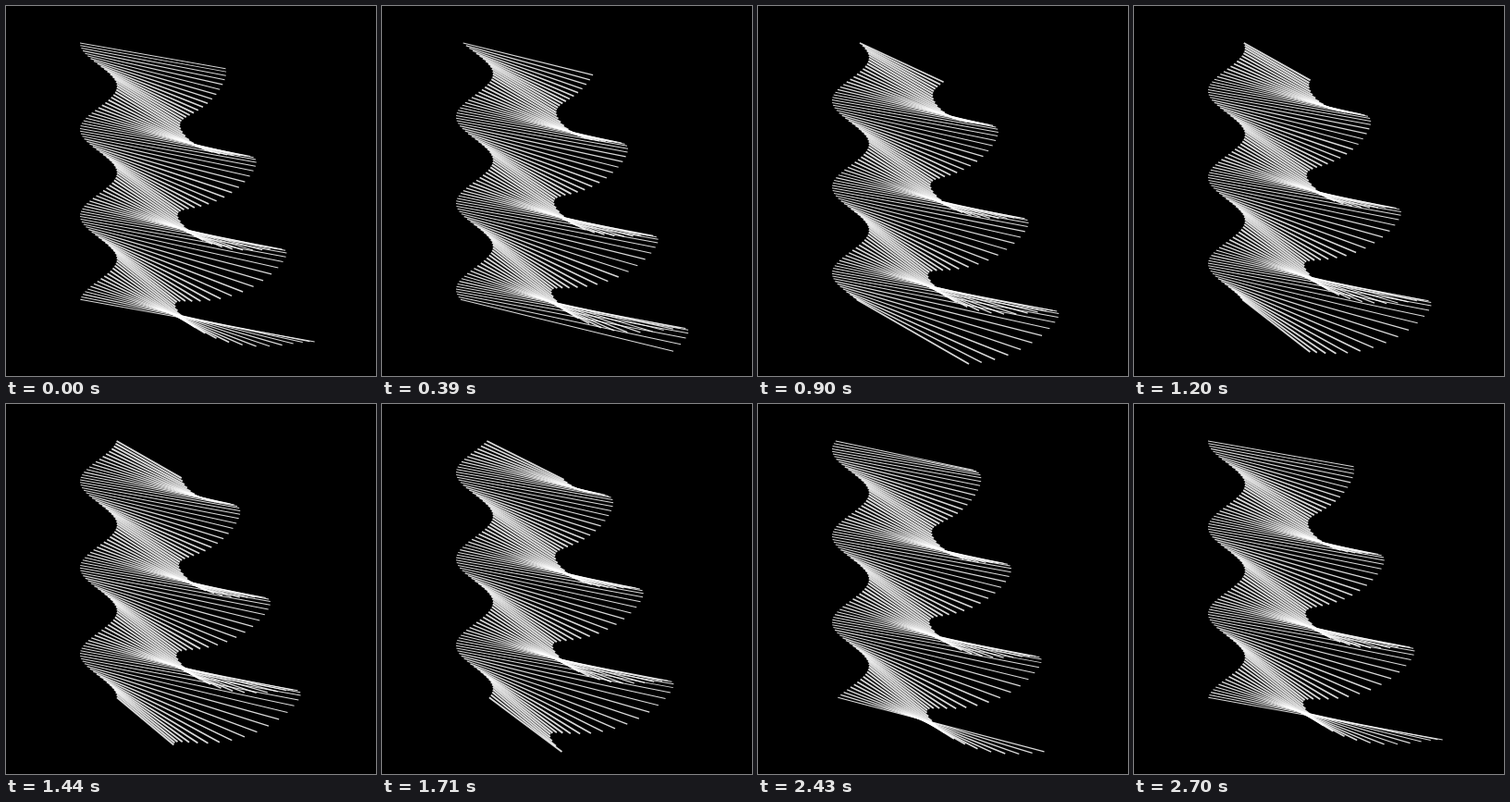
Animation, 400 px wide and 400 px high, one loop 2.73 s. Source, as an HTML page with a canvas:

```html
<!DOCTYPE html>
<html>
<head>
<meta charset="utf-8">
<style>
  html, body { margin: 0; width: 100%; height: 100%; overflow: hidden; background: #000; }
  canvas { display: block; }
</style>
</head>
<body>
<canvas id="stage" width="400" height="400"></canvas>
<script>
const ctx = document.getElementById('stage').getContext('2d');
const COUNT = 100, TURNS = 3, STEP = 30, LOOP = 2730, CYCLE = 2700;

// Swings from a (wave = 1) to b (wave = -1).
const swing = (a, b, wave) => (a + b) / 2 + (a - b) / 2 * wave;

function draw(time) {
  const progress = Math.floor(time % LOOP / STEP) * STEP / CYCLE;
  ctx.fillStyle = '#000';
  ctx.fillRect(0, 0, 400, 400);
  ctx.strokeStyle = 'rgba(255, 255, 255, 0.85)';
  for (let i = 0; i < COUNT; i++) {
    const wave = Math.cos(2 * Math.PI * (progress + TURNS * i / COUNT));
    const x = swing(80, 120, wave);
    const y = 40 + 2.8 * i;
    const length = swing(160 + i, 80, wave);
    const angle = swing(10, 30 + i / 10, wave) * Math.PI / 180;
    ctx.lineWidth = swing(1, 2, wave);
    ctx.beginPath();
    ctx.moveTo(x, y);
    ctx.lineTo(x + length * Math.cos(angle), y + length * Math.sin(angle));
    ctx.stroke();
  }
}

const start = performance.now();
function tick() {
  draw(performance.now() - start);
  requestAnimationFrame(tick);
}
tick();
</script>
</body>
</html>
```
